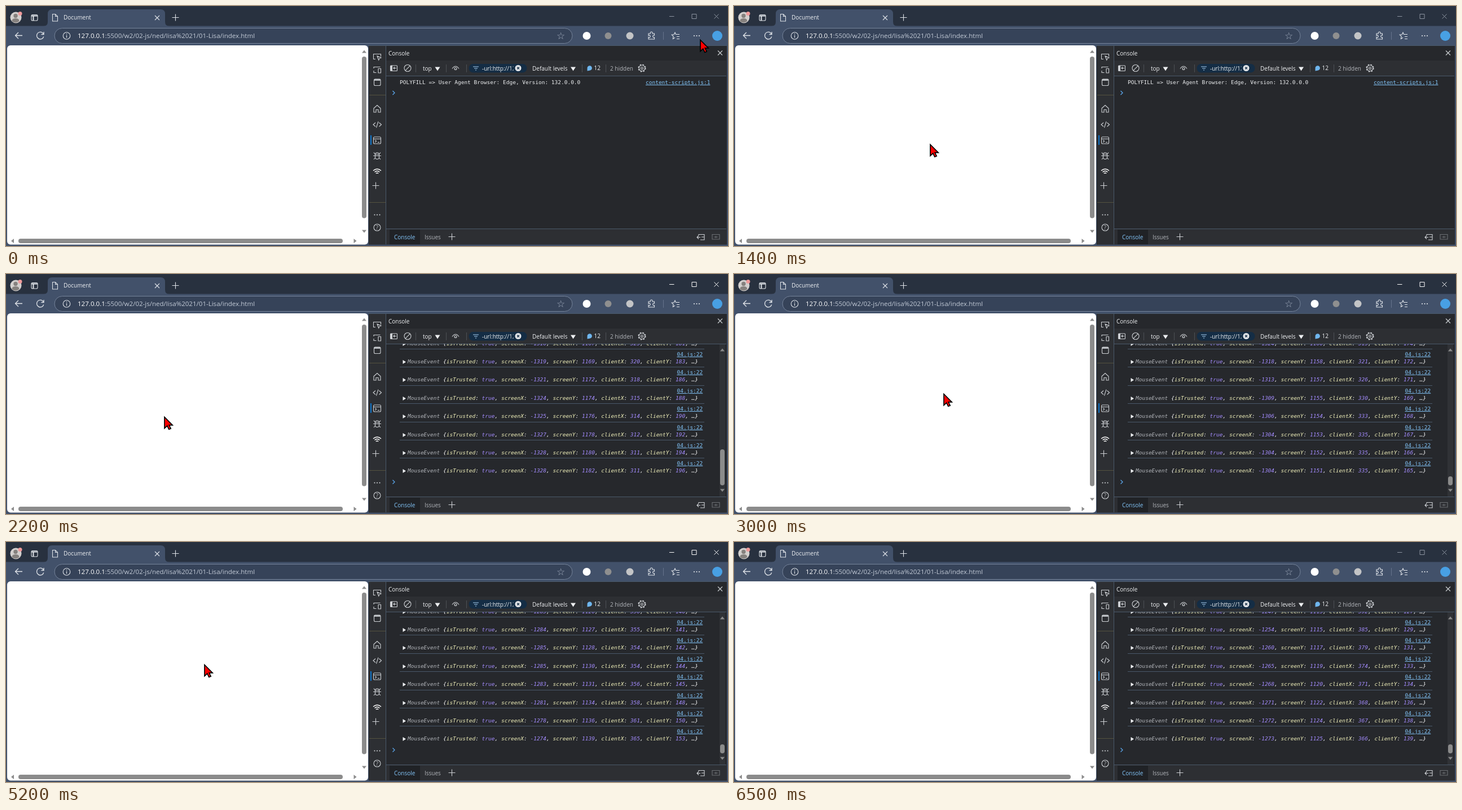
An HTML page for the animation above (6.6 s loop, 1280x427 px).

```html
<!DOCTYPE html>
<html lang="en">
<head>
<meta charset="utf-8">
<title>Mouse event log</title>
<style>
  html, body { margin: 0; width: 100%; height: 100%; overflow: hidden; background: #42516a; }
  svg { display: block; width: 100%; height: 100%; }
  text { font: 10px "Open Sans", "Noto Sans", sans-serif; fill: #eef0f2; white-space: pre; }
  .url { font-size: 11.55px; fill: #c2cad6; }
  .glyph { font: 17px "DejaVu Sans", sans-serif; fill: #a5b0c0; }
  .mono { font: 9.5px "DejaVu Sans Mono", monospace; }
  .event { font-style: oblique; fill: #fff; }
  .key { fill: #f0f0ba; }
  .type, .quiet { fill: #b2b5ba; }
  .num { fill: #a48cff; }
  .link, .active { fill: #83c6fa; }
  .link { text-decoration: underline; }
  .line, .tool { fill: none; stroke: #dfe3e8; stroke-width: 1.1; }
  .tool { stroke: #cdd0d4; }
  .dots { stroke-width: 2.2; stroke-linecap: round; stroke-dasharray: 0 4.5; }
  .grey { fill: #8b8b8b; }
  .sep { fill: none; stroke: #4a596a; }
</style>
</head>
<body>
<svg viewBox="0 0 1280 427" preserveAspectRatio="none">
  <defs>
    <clipPath id="body"><path d="M674 124.5H1278V396H674z"/></clipPath>
    <path id="cross" d="M-4 -4L4 4M4 -4L-4 4"/>
    <path id="plus" d="M-6 0H6M0 -6V6"/>
    <path id="tri" d="M-4 2.500L0 -2.500 4 2.500z"/>
  </defs>

  <!-- title bar -->
  <path fill="#28313f" d="M0 0H1280V35.500H0z"/>
  <path fill="#42516a" d="M66 36q8 0 8-8V14q0-8 8-8H274q8 0 8 8V28q0 8 8 8z"/>
  <circle cx="17.500" cy="20.500" r="10" fill="#d3d0ce"/>
  <circle cx="17" cy="17.500" r="3.700" fill="#85817e"/>
  <path fill="#85817e" d="M10.500 27q0-5 6.500-5t6.500 5q-6.500 5-13 0z"/>
  <circle cx="25" cy="13.500" r="3.500" fill="#ef9a9a"/>
  <g class="line">
    <rect x="45" y="15.500" width="11" height="10.500" rx="2"/>
    <path stroke-width="2" d="M45 17.500H56M48.500 18V26"/>
    <path d="M82.500 14.500h5l4 4V27h-9zM87.500 14.500v4h4"/>
    <use href="#cross" x="268" y="21"/>
    <use href="#plus" x="300.500" y="20.500"/>
  </g>
  <text x="102" y="24">Document</text>
  <g id="buttons" fill="none">
    <path d="M1176 18.500h8.500M1216 14.500h8v8h-8z"/>
    <use href="#cross" x="1259.500" y="18.500"/>
  </g>

  <!-- address bar -->
  <rect x="86" y="39.500" width="918" height="27" rx="13.500" fill="#364359" stroke="#75839a"/>
  <g class="line">
    <path stroke-width="1.300" d="M29 52.500H16.500m5.500-5.500l-5.500 5.500 5.500 5.500M66.500 50a6.300 6.300 0 1 0 .3 4.500M67 46v4.500h-4.500"/>
    <circle cx="107.500" cy="53" r="6.300"/>
    <path d="M107.500 52v4.500M107.500 49v1.400"/>
    <path d="M1139 49h3.500a2 2 0 1 1 3.500 0h3.500v3.200a2 2 0 1 0 0 3.600V59H1139v-3.500a2 2 0 1 0 0-3z"/>
    <path d="M1194 50.500h-6.500L1186 47l-1.800 3.700-4 .5 3 3-.8 4.300 3.600-2.200M1189 54.500h5M1189 58.500h5"/>
    <path d="M1165.500 46V60" stroke="#64728a"/>
    <path class="dots" d="M1220 53h9.500"/>
  </g>
  <text class="glyph" x="976" y="59">☆</text>
  <text class="url" x="127" y="57"><tspan fill="#fff">127.0.0.1</tspan>:5500/w2/02-js/ned/lisa%2021/01-Lisa/index.html</text>
  <circle cx="1029.500" cy="53" r="7" fill="#fff"/>
  <circle cx="1067.500" cy="53" r="6" fill="#8f8f8f"/>
  <circle cx="1106" cy="53" r="6.500" fill="#c3c4c6"/>
  <circle cx="1261" cy="53" r="9" fill="#48a0e4"/>

  <!-- page -->
  <rect x="2" y="70" width="640" height="354.500" rx="6" fill="#fff"/>
  <g class="grey">
    <rect x="631" y="90" width="8" height="287.500" rx="4"/>
    <rect x="22" y="414" width="575" height="8" rx="4"/>
    <use href="#tri" transform="translate(635 81)"/>
    <use href="#tri" transform="translate(635 401) rotate(180)"/>
    <use href="#tri" transform="translate(11.500 418) rotate(-90)"/>
    <use href="#tri" transform="translate(619 418) rotate(90)"/>
  </g>

  <!-- developer tools -->
  <path fill="#26282c" d="M643 70H1278V424.500H643z"/>
  <path fill="#2d2f33" d="M644 71h29.500V424H644zM674 97H1277V124H674zM674 397H1277V424H674z"/>
  <path class="sep" d="M643 70.500H1278M673.500 71V424M674 124.500H1277M674 396.500H1277"/>
  <path fill="none" stroke="#55523f" d="M644 158.500h29M644 349.500h29"/>
  <path fill="#0d74c8" d="M646 230h2v17h-2z"/>
  <g class="tool">
    <path d="M655 94.500h-3.500V85.500h13V90M658 89l7 3-3 1.300-1.300 3z"/>
    <path d="M652 111v-2.500h11.500M652 115v3.500h4.500M660 111.500h4.500v7.500H660z"/>
    <rect x="652.500" y="130" width="11.500" height="11.500" rx="2"/><path stroke-width="2.500" d="M653 131.500h10.500"/>
    <path d="M652 182l6-5.500 6 5.500v7h-4v-4.500h-4v4.500h-4z"/>
    <path d="M655 207.500l-4 3.500 4 3.500M661.500 207.500l4 3.500-4 3.500M660 205.500l-3.500 11"/>
    <rect x="651.500" y="233" width="13" height="12" rx="2"/><path d="M652 236.500h12.500M654.500 238.500l2 2-2 2M659 242.500h3"/>
    <rect x="654.500" y="261" width="7" height="11.500" rx="3.500"/>
    <path d="M651 266.500h14M652 260.500l2.500 3.500h7l2.500-3.500M652 273l2.500-3M664 273l-2.500-3"/>
    <path stroke="#fff" stroke-width="1.300" d="M651 293q7-6 14 0M653.500 295.500q4.500-4 9 0M655.800 298q2.200-2 4.400 0"/>
    <use href="#plus" x="655.500" y="319.500"/>
    <path class="dots" d="M653.500 371.500h9.500"/>
    <circle cx="658" cy="394" r="6"/>
    <use href="#cross" x="1266" y="83.500"/>
    <rect x="681.500" y="106" width="12" height="9.500" rx="1"/><path stroke-width="3" d="M683.500 106v9.500"/><path d="M692 110.500h-5m2-2l-2 2 2 2"/>
    <circle cx="712" cy="110.500" r="6"/><path d="M707.800 114.800l8.500-8.500"/>
    <path d="M791 111.500q6-8.500 12 0"/><circle cx="797" cy="111.500" r="2"/>
    <path d="M726.500 104v14M780.500 104v14M816.500 104v14M1021.500 104v14M1063.500 104v14" stroke="#4c4f54"/>
    <circle cx="1127.500" cy="110.500" r="2"/><circle cx="1127.500" cy="110.500" r="5.200"/>
    <circle cx="1127.500" cy="110.500" r="6.300" stroke-width="1.600" stroke-dasharray="2.500"/>
    <use href="#plus" x="790.500" y="410.500"/>
    <path d="M1228 408v-1.500h10V416h-7M1225 411.500h6m-3-3l-3 3 3 3M1233 411h5"/>
    <path stroke="#6c6f73" d="M1252 406.500h13v8.500h-13zM1255 411h7m-3.500-2v4"/>
  </g>
  <text class="quiet" x="655.700" y="397.500">?</text>
  <text x="678" y="88">Console</text>
  <text x="739" y="114.500">top</text>
  <path fill="#eef0f2" d="M760.500 108.500h9l-4.500 7zM1001 108.500h9l-4.500 7z"/>
  <rect x="820.500" y="103" width="103" height="15.500" rx="7.700" fill="#142d45"/>
  <path fill="none" stroke="#a8d0f2" stroke-width="1.200" d="M828 108h10M830 111h6M832 114h2"/>
  <svg x="844" y="103" width="55.500" height="16"><text x="0" y="11.500">-url:http://127</text></svg>
  <circle cx="908" cy="110.500" r="5.500" fill="#e4e7ea"/>
  <use href="#cross" transform="translate(908 110.500) scale(.5)" stroke="#142d45" stroke-width="2.400"/>
  <text x="933" y="114.500">Default levels</text>
  <path fill="#6fb6ee" d="M1030.500 115.500v-5a4.200 4.200 0 1 1 4 4.200z"/>
  <text x="1042.500" y="114">12</text>
  <text class="quiet" x="1071" y="114.500">2 hidden</text>
  <path fill="#202226" d="M680 398h54v26h-54z"/>
  <text class="active" x="688" y="414.500">Console</text>
  <text class="quiet" x="742" y="414.500">Issues</text>

  <g clip-path="url(#body)">
    <g id="intro">
      <text class="mono" x="698" y="139">POLYFILL =&gt; User Agent Browser: Edge, Version: 132.0.0.0</text>
      <text class="mono link" x="1134" y="139">content-scripts.js:1</text>
    </g>
    <g id="log"></g>
    <g id="scroll" class="grey">
      <path fill="#303236" d="M1265 125h10V396h-10z"/>
      <use href="#tri" transform="translate(1270 135)"/>
      <use href="#tri" transform="translate(1270 385) rotate(180)"/>
      <rect id="thumb" x="1266" width="8" rx="4"/>
    </g>
    <path id="prompt" fill="none" stroke="#5aa5ea" stroke-width="1.300" d="M685.500 -3.500l3.500 3.500-3.500 3.500"/>
  </g>
  <path id="cursor" fill="#f00" stroke="#000" stroke-width="1.700" d="M1 1.500V21.500l4.800-4.300 3 6.300 3.400-1.500-3-6.200h6z"/>
</svg>
<script>
const LOOP = 6600, STEP = 100, FOCUS = 1600, BLUR = 6500, LOG_START = 1800, ROWS = 8;
const $ = id => document.getElementById(id);
const clamp = (v, lo, hi) => Math.min(Math.max(v, lo), hi);
const mix = (a, b, p) => a + (b - a) * p;
const ease = p => p * p * (3 - 2 * p);

// time, then the pointer tip where it turns
const turns = [
  [0, 1230, 59], [500, 251, 211], [900, 399, 169], [1400, 347, 245], [2200, 280, 253], [2500, 220, 232],
  [3000, 371, 212], [3600, 288, 206], [3900, 1029, 109], [4200, 518, 181], [5200, 351, 217],
  [5400, 309, 195], [5600, 589, 183], [6300, 1282, 47]
];

// logged mouse strokes: time, then start, bend and end of a quadratic curve
const strokes = [
  [LOG_START, 373, 151, 362, 159, 361, 166],
  [2200, 323, 181, 312, 189.5, 311, 196],
  [3000, 315, 174, 338, 167.5, 335, 165],
  [4900, 356, 140, 349.5, 142.5, 365, 153],
  [5500, 392, 127, 366, 134, 366, 139]
];

// values at time t; each change takes at most `span` ms and ends on its key
function at(keys, t, span = LOOP) {
  const i = keys.findIndex(k => k[0] > t);
  if (i < 0) return keys[keys.length - 1].slice(1);
  const b = keys[i], a = keys[i - 1] || b;
  const from = Math.max(a[0], b[0] - span);
  const p = ease(clamp((t - from) / (b[0] - from), 0, 1));
  return a.slice(1).map((v, j) => mix(v, b[j + 1], p));
}

const curve = (a, b, c, p) => Math.round(mix(mix(a, b, p), mix(b, c, p), p));
const num = v => `<tspan class="num">${v}</tspan>`;
const pair = (key, v) => `<tspan class="key">${key}</tspan>: ${num(v)}, `;

function row(i, [x0, y0, x1, y1, x2, y2]) {
  const p = i / (ROWS - 1), x = curve(x0, x1, x2, p), y = curve(y0, y1, y2, p);
  const base = Math.round(126.6 + i * 32.4);
  return `<path class="sep" d="M698 ${base - 25.5}H1238"/>
    <text class="mono link" x="1189.500" y="${base - 13}">04.js:22</text>
    <path fill="#eef0f2" d="M703.500 ${base - 6}l5.500 3.500-5.500 3.500z"/>
    <text class="mono event" x="712" y="${base}"><tspan class="type">MouseEvent</tspan> {` +
    pair('isTrusted', true) + pair('screenX', x - 1639) + pair('screenY', y + 986) +
    pair('clientX', x) + pair('clientY', y) + '…}</text>';
}

let shown = -1;
function draw() {
  const t = Math.floor(performance.now() % LOOP / STEP) * STEP;
  if (t !== shown) {
    shown = t;
    const logging = t >= LOG_START;
    $('cursor').setAttribute('transform', `translate(${at(turns, t)})`);
    $('buttons').setAttribute('stroke', t >= FOCUS && t < BLUR ? '#fff' : '#8d95a1');
    $('intro').style.display = logging ? 'none' : '';
    $('scroll').style.display = logging ? '' : 'none';
    $('prompt').setAttribute('transform', `translate(0 ${logging ? 370 : 154.5})`);
    // the thumb shrinks as the log grows
    const thumb = clamp(64 * (400 / (t - LOG_START)) ** 2, 16, 236);
    $('thumb').setAttribute('y', 376 - thumb);
    $('thumb').setAttribute('height', thumb);
    const stroke = at(strokes, t, 300);
    $('log').innerHTML = logging ? Array.from({ length: ROWS }, (_, i) => row(i, stroke)).join('') : '';
  }
  requestAnimationFrame(draw);
}
draw();
</script>
</body>
</html>
```
